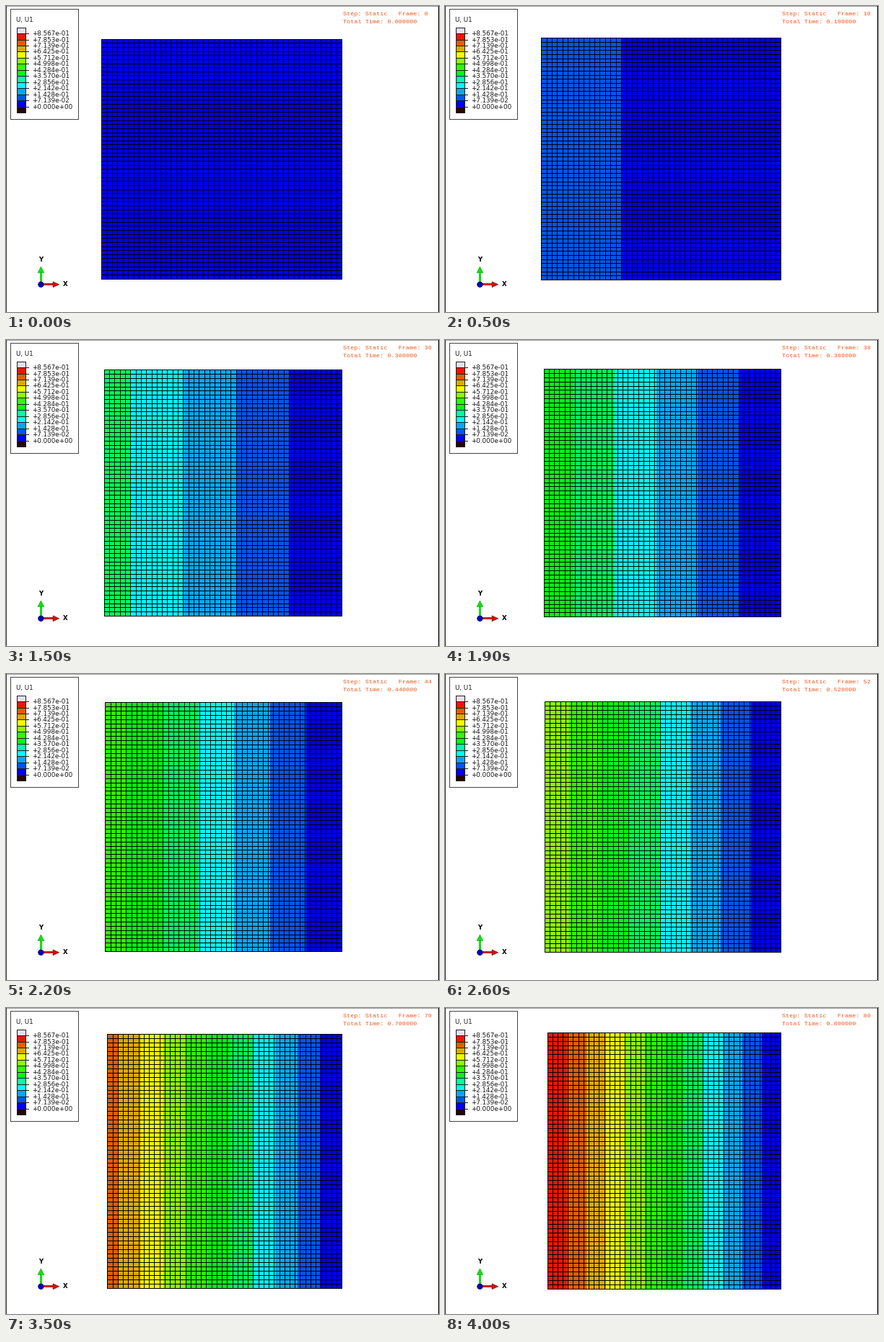
These frames come from a looping animation (600x425 px, 4100 ms). A matplotlib script:

```python
import numpy as np
import matplotlib.pyplot as plt
from matplotlib.animation import FuncAnimation
from matplotlib.collections import LineCollection
from matplotlib.patches import Circle, Polygon, Rectangle

W, H, DPI = 600, 425, 100
FRAMES, INTERVAL = 41, 100
COLS, ROWS = 45, 59
RIGHT, MID_Y = 465.6, 212.2
U_MAX = 0.85673
STEP = U_MAX / 12
PX = 72 / DPI  # one pixel in points

BANDS = ["#0000ff", "#0055ff", "#00a8ff", "#00ffff", "#00ff5c", "#00ff10",
         "#2eff00", "#8cff00", "#f0ff00", "#e0a800", "#e45d00", "#e41a00"]
BELOW, ABOVE, TEAL = "#240800", "#e2e2ea", "#00ffae"

fig = plt.figure(figsize=(W / DPI, H / DPI), dpi=DPI, facecolor="white")
ax = fig.add_axes([0, 0, 1, 1])
ax.set_xlim(0, W)
ax.set_ylim(H, 0)
ax.axis("off")


def box(x, y, w, h, color, z=1):
    patch = Rectangle((x, y), w, h, fc=color, ec="none", lw=0,
                      snap=False, zorder=z)
    return ax.add_patch(patch)


def label(x, y, text, size, color="#181818", font="DejaVu Sans", **kw):
    return ax.text(x, y, text, fontsize=size * PX, color=color,
                   family=font, **kw)


def draw_border():
    box(0, 0, W, 1, "#a0a0a0")
    box(0, 0, 1, H, "#333333")
    box(W - 1, 0, 1, H, "#000000")


def draw_legend():
    x0, y0, x1, y1 = 6, 4, 100, 157
    for x, y, w, h in [(x0, y0, x1 - x0 + 1, 1), (x0, y1, x1 - x0 + 1, 1),
                       (x0, y0, 1, y1 - y0 + 1), (x1, y0, 1, y1 - y0 + 1)]:
        box(x, y, w, h, "#444444")
    label(14, 22.3, "U, U1", 8.8)

    colors = BANDS[:4] + [TEAL] + BANDS[5:]
    swatches = [ABOVE] + colors[::-1] + [BELOW]
    edges = np.round(29.6 + 8.46 * np.arange(15)).astype(int)
    for color, top, bottom in zip(swatches, edges, edges[1:]):
        box(15, top, 13, bottom - top, color)
    for y in edges:
        box(15, y, 13, 1, "#202020", 2)
    for x in (15, 27):
        box(x, edges[0], 1, edges[-1] - edges[0], "#202020", 2)
    for i, y in enumerate(edges[1:-1]):
        box(28, y, 4, 1, "#202020", 2)
        label(36.5, y + 3.4, f"+{(12 - i) * STEP:.3e}", 8.8)


def draw_triad():
    x, y = 48.4, 386.8
    green, red = "#10e010", "#d01400"
    box(47, 370, 3, 14, green)
    box(51, 385, 15, 3, red)
    heads = [([(x, 362), (x - 4.4, 370.5), (x + 4.4, 370.5)], green, "#0a9a0a"),
             ([(73.8, y), (65, y - 4), (65, y + 4)], red, "#6a0a00")]
    for points, fill, edge in heads:
        ax.add_patch(Polygon(points, fc=fill, ec=edge, lw=0.5 * PX, zorder=2))
    ax.add_patch(Circle((x, y), 3.7, fc="#0000c8", ec="#000050",
                        lw=0.8 * PX, zorder=3))
    label(x - 0.3, 355.4, "Y", 8.6, "black", weight="bold", ha="center")
    label(82.3, 389.4, "X", 8.6, "black", weight="bold", ha="center")


draw_border()
draw_legend()
draw_triad()

bands = [box(0, 0, 0, 0, color, 3) for color in BANDS]
mesh = LineCollection([], colors="black", linewidths=PX, capstyle="butt",
                      snap=False, zorder=4)
ax.add_collection(mesh, autolim=False)
header = [label(467, y, "", 8.5, "#f05a1e", "Liberation Mono")
          for y in (13.2, 23.7)]


def update(i):
    t = 0.02 * i
    left = 132.6 + 11.8 * t
    half = 166.5 + 14.2 * t

    # pixel centres keep the mesh lines one pixel wide
    xs = np.floor(np.linspace(left, RIGHT, COLS + 1)) + 0.5
    ys = np.round(np.linspace(MID_Y - half, MID_Y + half, ROWS + 1)) + 0.5
    x0, x1, y0, y1 = xs[0], xs[-1], ys[0], ys[-1]
    mesh.set_segments(
        [[(x, y0 - 0.5), (x, y1 + 0.5)] for x in xs]
        + [[(x0 - 0.5, y), (x1 + 0.5, y)] for y in ys])

    # displacement falls linearly from the left side to zero on the right
    peak = max(U_MAX * t / 0.8, 1e-9)
    share = np.minimum(np.arange(13) * STEP / peak, 1)
    cuts = np.round(x1 - (x1 - x0) * share)
    for band, a, b in zip(bands, cuts, cuts[1:]):
        band.set_bounds(b, y0, a - b, y1 - y0)
        band.set_visible(a > b)

    header[0].set_text(f"Step: Static   Frame: {2 * i}")
    header[1].set_text(f"Total Time: {t:.6f}")
    return [*bands, mesh, *header]


anim = FuncAnimation(fig, update, frames=FRAMES, interval=INTERVAL,
                     repeat=True, repeat_delay=0, blit=False)
plt.show()
```
